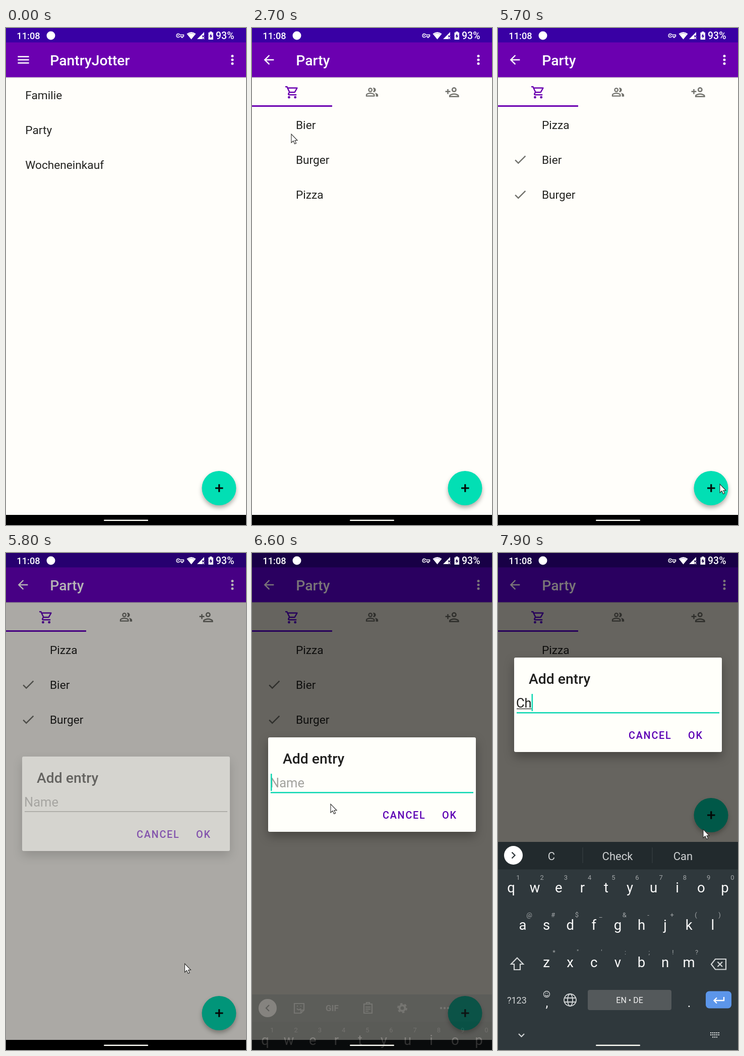
An HTML page for the animation above (8 s loop, 476 by 984 pixels).

```html
<!DOCTYPE html>
<html lang="de">
<head>
<meta charset="utf-8">
<title>List app</title>
<style>
  html, body { margin: 0; width: 100%; height: 100%; overflow: hidden; background: #000; }
  svg { display: block; width: 100vw; height: 100vh; font-family: Roboto, sans-serif; }
  #app {
    --d: 0%;
    --status: color-mix(in srgb, #3900a4, #180046 var(--d));
    --bar: color-mix(in srgb, #6b00b0, #2a0060 var(--d));
    --on-bar: color-mix(in srgb, #ffffff, #7a7578 var(--d));
    --page: color-mix(in srgb, #fffefa, #66645f var(--d));
    --ink: color-mix(in srgb, #232320, #0e0e0d var(--d));
    --icon: color-mix(in srgb, #72726c, #2f2f2c var(--d));
    --accent: color-mix(in srgb, #6b00b0, #26005a var(--d));
    --fab: color-mix(in srgb, #02dfb4, #005848 var(--d));
  }
  .bar { fill: var(--on-bar); }
  .title { font-size: 28.3px; font-weight: 500; }
  .row { font-size: 22.67px; fill: var(--ink); }
  .icon { fill: var(--icon); }
  #fab { filter: drop-shadow(0 5px 4px rgba(30, 30, 20, .35)); }
  #dialog .box { fill: #fffffa; filter: drop-shadow(0 9px 10px rgba(0, 0, 0, .3)); }
  #dialog .title { fill: #20201e; }
  .button { font-size: 19.8px; font-weight: 500; letter-spacing: .089em; fill: #5c00b4; }
  .field { font-size: 25.5px; }
  #keys { font-size: 27.5px; fill: #fafafa; text-anchor: middle; }
  #keys .hint { font-size: 13px; fill: #a2a6a8; }
  .line { fill: none; stroke: #d2d5d6; stroke-width: 2.2; }
  #tools .line, #tools .dots { stroke: #b4b8b8; }
  #words { font-size: 22px; fill: #cfd2d3; text-anchor: middle; }
</style>
</head>
<body>
<svg viewBox="0 0 476 984" preserveAspectRatio="none">
  <g id="app">
    <rect width="476" height="984" fill="#000"/>
    <rect y="97" width="476" height="867" fill="var(--page)"/>
    <rect width="476" height="29" fill="var(--status)"/>
    <rect y="28.500" width="476" height="69" fill="var(--bar)"/>
    <rect y="97.500" width="476" height="1.500" fill="#333" opacity=".18"/>
    <g class="bar">
      <circle cx="449" cy="55.500" r="2.500"/><circle cx="449" cy="63" r="2.500"/><circle cx="449" cy="70.500" r="2.500"/>
    </g>

    <g id="home">
      <path class="bar" transform="translate(19.700 48.200) scale(1.232)" d="M3 6h18v2H3zM3 11h18v2H3zM3 16h18v2H3z"/>
      <text class="bar title" x="87.300" y="74">PantryJotter</text>
      <text class="row" x="38.300" y="141">Familie</text>
      <text class="row" x="38.300" y="210">Party</text>
      <text class="row" x="38.300" y="279">Wocheneinkauf</text>
    </g>

    <g id="list">
      <path class="bar" transform="translate(18.700 48.200) scale(1.232)" d="M20 11H7.830l5.590-5.590L12 4l-8 8 8 8 1.410-1.410L7.830 13H20z"/>
      <text class="bar title" x="87.300" y="74">Party</text>
      <path fill="var(--accent)" fill-rule="evenodd" transform="translate(64.800 112.500) scale(1.232)" d="M15.550 13c.75 0 1.410-.41 1.750-1.030l3.580-6.490A1 1 0 0 0 20 4H5.210l-.94-2H1v2h2l3.600 7.590-1.350 2.440C4.520 15.370 5.480 17 7 17h12v-2H7l1.100-2zM6.160 6h12.150l-2.760 5H8.530zM7 18a2 2 0 1 0 0 4a2 2 0 1 0 0-4zM17 18a2 2 0 1 0 0 4a2 2 0 1 0 0-4z"/>
      <g class="icon" transform="translate(224.800 113.800) scale(1.1)">
        <path fill="none" stroke="var(--icon)" stroke-width="2" d="M9 5a3 3 0 1 0 0 6a3 3 0 1 0 0-6zM2 19v-2c0-2 4.700-3 7-3s7 1 7 3v2z"/>
        <path d="M16.670 13.130C18.040 14.060 19 15.320 19 17v3h4v-3c0-2.180-3.570-3.470-6.330-3.870zM15 12a4 4 0 0 0 0-8c-.47 0-.91.1-1.330.24a6 6 0 0 1 0 7.520c.42.14.86.24 1.330.24z"/>
      </g>
      <path class="icon" fill-rule="evenodd" transform="translate(382.300 112.300) scale(1.232)" d="M15 12a4 4 0 1 0 0-8a4 4 0 1 0 0 8zm0-6a2 2 0 1 1 0 4a2 2 0 1 1 0-4zm0 8c-2.670 0-8 1.340-8 4v2h16v-2c0-2.660-5.330-4-8-4zm-6 4c.22-.72 3.310-2 6-2 2.700 0 5.800 1.290 6 2zM6 15v-3h3v-2H6V7H4v3H1v2h3v3z"/>
      <rect y="153" width="159" height="3" fill="var(--accent)"/>
      <g id="items"></g>
    </g>

    <g id="fab">
      <circle cx="422.500" cy="911" r="34" fill="var(--fab)"/>
      <path d="M415 911h15.500M422.750 903.250v15.500" stroke="#040806" stroke-width="3.200"/>
    </g>
  </g>

  <g fill="#fff">
    <text x="21.300" y="22" font-size="18.300" font-weight="500">11:08</text>
    <circle cx="89" cy="15" r="8.500"/>
    <path d="M341.500 11.500a3.500 3.500 0 1 0 3.300 5H348v2.200h2.500v-2.200h2v-3h-7.700a3.500 3.500 0 0 0-3.300-2z" fill="none" stroke="#fff" stroke-width="1.400"/>
    <circle cx="341.500" cy="15" r="1.200"/>
    <path d="M358.500 11.500q9-7 18 0l-9 11z"/>
    <path d="M361 12.500q6.500-4 13 0" fill="none" stroke="#3900a4" opacity=".4"/>
    <path d="M379 22L393 8v7h-4v7z"/>
    <path d="M388.800 17l4.400 5m0-5l-4.400 5" stroke="#fff" stroke-width="1.300"/>
    <path d="M404 7h4.500v1.800h2.500V23h-9.500V8.800h2.500zM407 11l-3.600 5.700h2.200v4l3.700-5.700H407z" fill-rule="evenodd"/>
    <text x="416" y="22" font-size="19.500" font-weight="500">93%</text>
  </g>

  <g id="dialog">
    <rect class="box" x="32" width="412" height="187" rx="3"/>
    <text class="title" x="61" y="52">Add entry</text>
    <text class="field" id="hint" x="36" y="99" fill="#a2a29e">Name</text>
    <text class="field" id="typed" x="36" y="99" fill="#20201e"></text>
    <path id="compose" stroke="#20201e" stroke-width="1.300"/>
    <rect id="under" x="37" width="402"/>
    <rect id="caret" y="72" width="2.600" height="34" fill="#12d8b4"/>
    <text class="button" x="259" y="161">CANCEL</text>
    <text class="button" x="377" y="161">OK</text>
  </g>

  <g id="board">
    <rect y="572" width="476" height="412" fill="#2f383c"/>
    <rect y="572" width="476" height="54.500" fill="#222a2d"/>
    <g id="tools">
      <rect y="572" width="476" height="54.500" fill="#394246"/>
      <circle cx="31" cy="599" r="18" fill="#fff"/>
      <path d="M34 593l-6 6 6 6" fill="none" stroke="#3c4447" stroke-width="2.200"/>
      <path class="line" d="M84 590h19v13l-6 6h-13zM97 609v-6h6M89 600q4 5 8 0M89 595h2M96 595h2"/>
      <text x="146" y="605" font-size="17" font-weight="700" fill="#b4b8b8">GIF</text>
      <path class="line" d="M222 591h16v18h-16zM227 591v-3h6v3M225 597h10M225 601h10M225 605h6"/>
      <circle class="line" cx="298" cy="599" r="5.500" style="stroke-width:4"/>
      <circle class="line" cx="298" cy="599" r="8.500" stroke-dasharray="4.500 4.400" style="stroke-width:3"/>
      <path class="dots" d="M375 599h15" stroke-width="4.500" stroke-linecap="round" stroke-dasharray="0 7"/>
    </g>
    <g id="words">
      <circle cx="30.500" cy="598.500" r="18.500" fill="#fff"/>
      <path d="M27.500 592.500l6 6-6 6" fill="none" stroke="#30383b" stroke-width="2.300"/>
      <path d="M168 583v31M306 583v31" stroke="#3a4346"/>
      <text x="106" y="608">C</text><text x="237" y="608">Check</text><text x="367" y="608">Can</text>
    </g>
    <g id="keys"></g>
    <path class="line" d="M38 801.500L26 814h6v11h12v-11h6z"/>
    <path class="line" d="M431 804h21v20.500h-21l-8-10.250zM435.500 809.500l9.500 9.500m0-9.500l-9.500 9.500"/>
    <text x="18" y="891.500" font-size="18" fill="#d2d5d6">?123</text>
    <g class="line" style="stroke-width:1.300">
      <circle cx="96.500" cy="873.500" r="6"/>
      <path d="M93 875q3.500 4 7 0M94 871.500h1.500M97.500 871.500H99"/>
    </g>
    <g class="line" style="stroke-width:1.800">
      <circle cx="143" cy="885" r="12"/><ellipse cx="143" cy="885" rx="5" ry="12"/>
      <path d="M132 881h22M132 889h22"/>
    </g>
    <rect x="178" y="865" width="166" height="40" rx="4" fill="#54595b"/>
    <text x="261" y="891" font-size="16" fill="#f0f0f0" text-anchor="middle">EN • DE</text>
    <g fill="#fafafa" font-size="25" text-anchor="middle"><text x="97" y="899">,</text><text x="379" y="899">.</text></g>
    <rect x="412" y="867.500" width="51" height="34" rx="7" fill="#5c96ea"/>
    <path d="M448 879v7h-19M434 880.500l-5.500 5.500 5.500 5.500" fill="none" stroke="#fff" stroke-width="2.300"/>
    <path class="line" d="M41 952l5.500 5.500 5.500-5.500"/>
    <path d="M421 950h18M421 954h18M425 958.500h10" stroke="#e4e6e6" stroke-width="2.200" stroke-dasharray="2.400 1.500"/>
  </g>
  <rect x="194" y="973.500" width="88" height="2.500" rx="1.250" fill="#fdfdf6"/>
  <path id="mouse" d="M0 0V17L4 13.500L6.700 19.500L9.600 18.200L7 12.500H12Z" fill="#fff" stroke="#2b2b28" stroke-width="1.100"/>
</svg>
<script>
const LOOP = 8000, STEP = 100;
const $ = id => document.getElementById(id);
const show = (id, on) => $(id).style.display = on ? '' : 'none';
const move = (el, x, y) => el.setAttribute('transform', `translate(${x} ${y})`);

// Piecewise linear track of [time, ...values].
function track(keys, t) {
  if (t <= keys[0][0]) return keys[0].slice(1);
  const i = keys.findIndex(k => k[0] > t);
  if (i < 0) return keys[keys.length - 1].slice(1);
  const a = keys[i - 1], b = keys[i], p = (t - a[0]) / (b[0] - a[0]);
  return a.slice(1).map((v, n) => v + (b[n + 1] - v) * p);
}
const ramp = (t, from, to) => Math.min(1, Math.max(0, (t - from) / (to - from)));
const ease = p => p * p * (3 - 2 * p);

// Each item: label, row before and after each of the two moves, time it is ticked.
const items = [['Bier', [0, 2, 1], 3600], ['Burger', [1, 0, 2], 4800], ['Pizza', [2, 1, 0], LOOP]];
$('items').innerHTML = items.map(([name]) =>
  `<g><text class="row" x="87" y="199.700">${name}</text>
   <path class="icon" transform="translate(29 176.500) scale(1.25)" d="M9 16.170L4.830 12l-1.420 1.410L9 19 21 7l-1.410-1.410z"/></g>`).join('');
const itemEls = [...$('items').children];

// Letters, their corner hints, first x, hint x, baseline.
const rows = [
  ['qwertyuiop', '1234567890', 26, 40, 672],
  ['asdfghjkl', '@#$_&-+()', 49, 62, 746],
  ['zxcvbnm', '*"\':;!?', 96, 111, 820]
];
$('keys').innerHTML = rows.map(([letters, hints, x, hx, y]) => [...letters].map((c, i) =>
  `<text x="${x + i * 47.1}" y="${y}">${c}</text>
   <text class="hint" x="${hx + i * 47.2}" y="${y - 25}">${hints[i].replace('&', '&amp;')}</text>`).join('')).join('');

const mousePath = [
  [1500, 1, 47], [2100, 68, 202], [2600, 68, 202], [2700, 78, 210], [3200, 104, 206], [3900, 104, 206],
  [4300, 113, 247], [4500, 115, 194], [5100, 115, 194], [5500, 458, 922], [5700, 440, 903],
  [5900, 269, 723], [6400, 156, 497], [6600, 156, 497], [7300, 407, 547]
];
const dimming = [[5700, 0], [5800, 55], [5900, 92], [6000, 100]];
const dialogY = [[6500, 403], [6600, 365], [6700, 246], [6800, 207]];
const boardIn = [[6500, 412, 0], [6600, 302, .2], [6700, 80, .8], [6800, 0, 1]];

function render(t) {
  show('home', t < 100);
  show('list', t >= 100);

  const first = ease(ramp(t, 3700, 4000)), second = ease(ramp(t, 4900, 5200));
  items.forEach(([, [a, b, c], tick], i) => {
    move(itemEls[i], 0, 69.1 * (a + (b - a) * first + (c - b) * second));
    itemEls[i].lastElementChild.style.opacity = ramp(t, tick, tick + 200);
  });

  $('app').style.setProperty('--d', track(dimming, t)[0] + '%');
  move($('fab'), 0, t >= 6700 ? -392 : 0);

  const focus = t >= 6500;
  const text = t >= 7900 ? 'Ch' : t >= 7500 ? 'C' : '';
  const end = [37, 53, 66.5][text.length];
  show('dialog', t >= 5800);
  $('dialog').style.opacity = ramp(t, 5700, 5900);
  move($('dialog'), 0, track(dialogY, t)[0]);
  show('hint', !text);
  $('typed').textContent = text;
  $('compose').setAttribute('d', text ? `M37 101.500H${end}` : '');
  $('under').setAttribute('y', focus ? 108 : 108.3);
  $('under').setAttribute('height', focus ? 2.6 : 1.3);
  $('under').setAttribute('fill', focus ? '#12d8b4' : '#8e8d8a');
  $('caret').setAttribute('x', end);
  show('caret', focus && Math.floor((t - 6500) / 500) % 2 === 0);

  const [y, alpha] = track(boardIn, t);
  show('board', alpha > 0);
  $('board').style.opacity = alpha;
  move($('board'), 0, y);
  show('tools', t < 7600);
  show('words', t >= 7600);

  show('mouse', t >= 1500);
  move($('mouse'), ...track(mousePath, t));
}

function tick() {
  render(Math.floor(performance.now() % LOOP / STEP) * STEP);
  requestAnimationFrame(tick);
}
tick();
</script>
</body>
</html>
```
